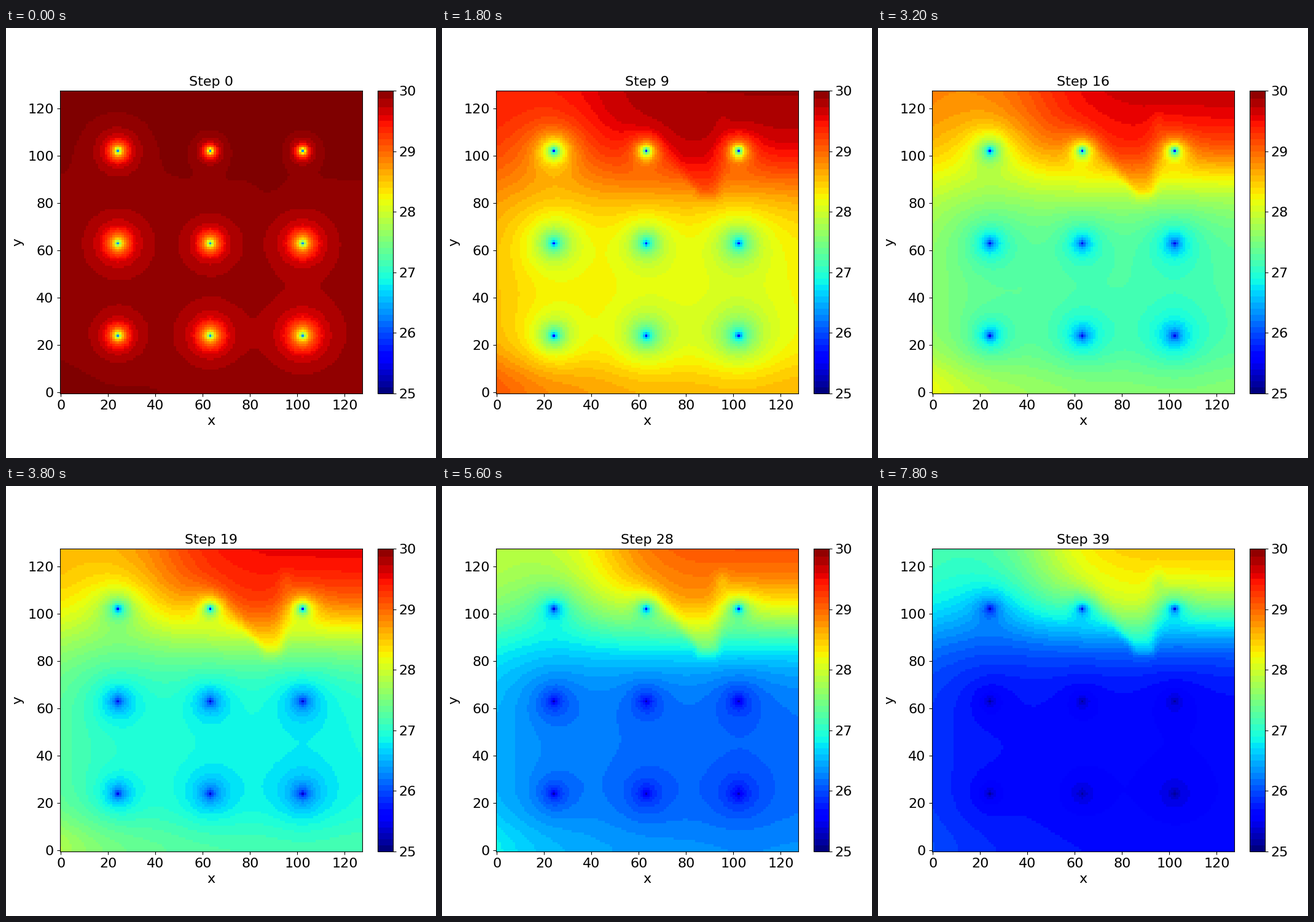
A matplotlib script for the animation above (8000 ms loop, 700x700 px).

```python
import numpy as np
import matplotlib.pyplot as plt
from matplotlib.animation import FuncAnimation
from matplotlib.colors import ListedColormap

N, STEPS, SIZE = 128, 40, 700
LOW, HIGH = 25, 30
T_REF = 33          # step at which the decay map is defined
WELL_POS = (24, 63, 102)
REACH = ((0.95, 1.2, 1.4), (1.2, 1.0, 1.2), (0.9, 0.5, 0.5))

X, Y = np.meshgrid(np.arange(N), np.arange(N))


def sigmoid(z):
    return 1 / (1 + np.exp(-z))


def bump(x, y, sx, sy):
    return np.exp(-((X - x) / sx) ** 2 - ((Y - y) / sy) ** 2)


def tongue():
    """Tight wedge of rock that opens upwards from (89, 85)."""
    rise = np.maximum(Y - 85, 0)
    offset = (X - 89 + 0.35 * rise) / (5 + 0.4 * rise)
    return np.exp(-offset ** 4) * sigmoid((Y - 83) / 1.5) * sigmoid((112 - Y) / 4)


# Decay at T_REF: high plateau below, slow zone on top, slower at the edges.
edge = (0.1 + 0.09 * np.exp(-X / 20)) * np.exp(-(Y / 15) ** 2)
plateau = 1.74 - 0.29 * np.exp(-X / 40) - edge
slow = 0.54 + 0.33 * sigmoid((X - 42) / 12)
DECAY = plateau * (1 - slow * sigmoid((Y - 91) / 10))
DECAY *= (1 - 0.28 * tongue()) * (1 + 0.18 * bump(95, 114, 3, 5))
POWER = 0.95 + 0.23 / DECAY + 1.5 * edge


def well_factor(x, y, reach, step):
    fresh = np.exp(-step / 2)
    radius = reach * (14 - 6 * fresh)
    core = 0.25
    r2 = (X - x) ** 2 + (Y - y) ** 2
    cone = 0.5 * np.log((r2 + radius ** 2) / (r2 + core ** 2))
    depth = (0.81 - 0.09 * fresh) / np.log(radius / core)
    return 1 - depth * cone * np.exp(-r2 / (1.8 * radius) ** 2)


def field(step):
    t = max(step, 0.4) / T_REF
    p = np.exp(-DECAY * t ** POWER)
    for y, row in zip(WELL_POS, REACH):
        for x, reach in zip(WELL_POS, row):
            p = p * well_factor(x, y, reach, step)
    return LOW + (HIGH - LOW) * p


def banded_jet():
    edges = np.r_[np.arange(0, 0.89, 0.02), 0.9, 0.917, 0.946, 0.974, 0.993, 1]
    mids = (edges[1:] + edges[:-1]) / 2
    mids[0] = 0
    v = (np.arange(500) + 0.5) / 500
    return ListedColormap(plt.get_cmap("jet")(mids[np.searchsorted(edges, v) - 1]))


def box(x, y, w, h):
    return [x / SIZE, y / SIZE, w / SIZE, h / SIZE]


plt.rcParams.update({"font.family": "DejaVu Sans", "font.size": 16})
fig = plt.figure(figsize=(SIZE / 100, SIZE / 100), dpi=100, facecolor="white")
left, bottom, side = 87.5, 105.07, 492.86
ax = fig.add_axes(box(left, bottom, side, side))
cax = fig.add_axes(box(left + side + 25, bottom, side / 20, side))

im = ax.imshow(field(0), origin="lower", cmap=banded_jet(), vmin=LOW, vmax=HIGH,
               interpolation="nearest", aspect="auto")
ax.set_xticks(range(0, N, 20))
ax.set_yticks(range(0, N, 20))
ax.set_xlabel("x")
ax.set_ylabel("y")
title = ax.set_title("Step 0", fontsize=16)
fig.colorbar(im, cax=cax, ticks=range(LOW, HIGH + 1))


def update(step):
    im.set_data(field(step))
    title.set_text(f"Step {step}")
    return im, title


anim = FuncAnimation(fig, update, frames=STEPS, interval=200, repeat=True,
                     repeat_delay=0, blit=False)
plt.show()
```
